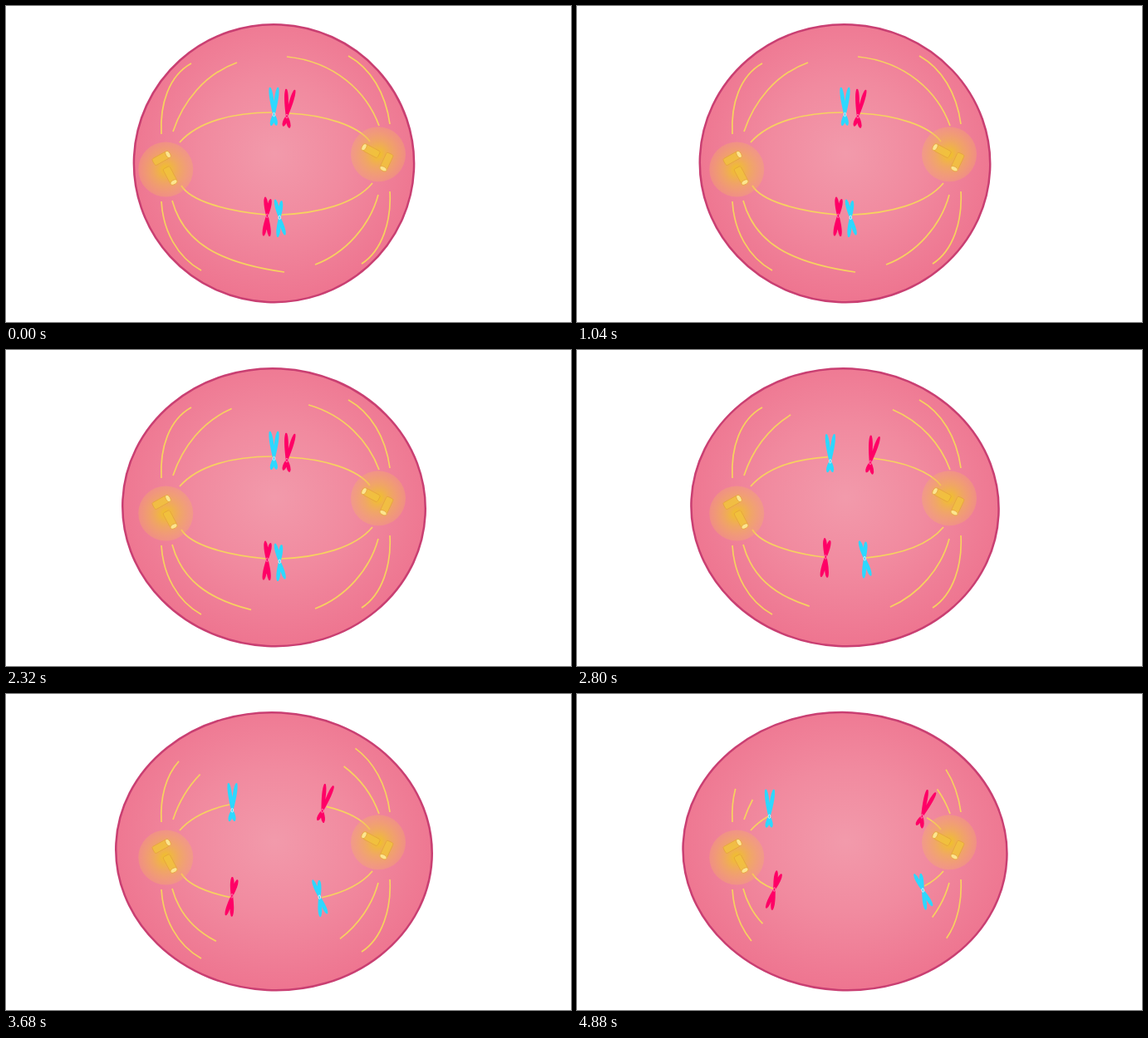
An HTML page for the animation above (4.96 s loop, 680 px wide and 380 px high).

```html
<!DOCTYPE html>
<html lang="en">
<head>
<meta charset="utf-8">
<title>Anaphase</title>
<style>
  html, body { margin: 0; width: 100%; height: 100%; overflow: hidden; background: #fff; }
  svg { display: block; }
</style>
</head>
<body>
<svg width="680" height="380" viewBox="0 0 680 380">
  <defs>
    <radialGradient id="plasm" cx=".5" cy=".465" r=".53">
      <stop offset="0" stop-color="#f29aab"/>
      <stop offset=".5" stop-color="#f18a9f"/>
      <stop offset="1" stop-color="#ee7590"/>
    </radialGradient>
    <radialGradient id="glow">
      <stop offset="0" stop-color="#efc61e" stop-opacity=".95"/>
      <stop offset=".5" stop-color="#f0b848" stop-opacity=".65"/>
      <stop offset="1" stop-color="#f3b45e" stop-opacity=".32"/>
    </radialGradient>
    <g id="centriole" stroke="#e6a53e" stroke-width=".8">
      <rect x="-20" y="-4.5" width="20" height="9" rx="2" fill="#f1c13f" fill-opacity=".85"/>
      <ellipse rx="2.6" ry="4.5" fill="#fce58f"/>
    </g>
  </defs>
  <ellipse id="cell" cx="322.5" cy="189.2" ry="167" transform="rotate(2.9 322.5 189.2)"
    fill="url(#plasm)" stroke="#c93f72" stroke-width="2.5"/>
  <g id="fibres" fill="none" stroke="#f7d25f" stroke-width="1.7"></g>
  <circle cx="192.3" cy="196.5" r="33" fill="url(#glow)"/>
  <circle cx="448" cy="178.3" r="33" fill="url(#glow)"/>
  <use href="#centriole" transform="translate(195 178.5) rotate(-29)"/>
  <use href="#centriole" transform="translate(202 212) rotate(62)"/>
  <use href="#centriole" transform="translate(431 169.7) rotate(208)"/>
  <use href="#centriole" transform="translate(454 195.7) rotate(115)"/>
  <g id="chromosomes"></g>
</svg>
<script>
const STEP = 80, STEPS = 62, MOVE_START = 29, MOVE_END = 59.8;
const $ = id => document.getElementById(id);
const clamp = v => Math.max(0, Math.min(1, v));

function add(parent, tag, attrs) {
  const el = document.createElementNS('http://www.w3.org/2000/svg', tag);
  for (const key in attrs) el.setAttribute(key, attrs[key]);
  parent.append(el);
  return el;
}

// Spindle fibres drawn from the pole outwards: path, step shortening begins, length lost
const fibres = [
  ['M187 154C185 118 196 84 223 69', 39, 57],
  ['M201 151C213 115 239 82 278 68', 26.5, 91],
  ['M209 164C231 139 273 128 320 128', MOVE_START, 93],
  ['M211 216C222 234 262 246 313 251', MOVE_START, 78],
  ['M187 235C189 270 206 302 235 318', 47, 33],
  ['M200 234C214 285 257 309 335 320', 13.5, 122],
  ['M462 142C457 105 439 75 412 60', 42, 45],
  ['M449 144C434 103 396 67 338 61', 19.5, 113],
  ['M438 163C424 144 384 131 340 129', MOVE_START, 84],
  ['M441 213C420 238 377 249 331 251', MOVE_START, 90],
  ['M462 223C464 258 453 294 428 310', 49, 23.5],
  ['M448 227C438 264 409 297 372 311', 33, 71]
].map(([d, start, loss]) => {
  const el = add($('fibres'), 'path', { d });
  return { el, start, loss, length: el.getTotalLength() };
});

// One chromosome arm: a rounded petal from the centromere to its tip
function petal([x, y]) {
  const len = Math.hypot(x, y), nx = -y / len * 2.1, ny = x / len * 2.1;
  const side = s => `${x * .4 + s * nx * .6} ${y * .4 + s * ny * .6} ${x * .8 + s * nx} ${y * .8 + s * ny}`;
  const back = `${x * .8 - nx} ${y * .8 - ny} ${x * .4 - nx * .6} ${y * .4 - ny * .6}`;
  return `M0 0C${side(1)} ${x} ${y}C${back} 0 0Z`;
}

const BLUE = ['#2dd8ff', '#d9f7ff'], RED = ['#ff0066', '#ff7fae'];
const chromosomes = [
  { at: [322.5, 130.5], move: [-91, 16.8], turn: 1, hue: BLUE, tips: [[-4.7, -31.5], [4.7, -31.5], [-3.2, 12.3], [2.8, 12]] },
  { at: [338, 132.5], move: [77.3, 14.5], turn: 13, hue: RED, tips: [[-.8, -31.5], [9.3, -30.5], [-4, 11], [3, 13]] },
  { at: [314.3, 252.3], move: [-76.8, -17.3], turn: 13, hue: RED, tips: [[-2.2, -21.5], [4, -19], [-4.3, 23], [2.8, 23.5]] },
  { at: [329.3, 254.3], move: [87, -18.3], turn: -14, hue: BLUE, tips: [[-5.2, -20.5], [2.2, -19], [-2.2, 22.5], [6.2, 20]] }
].map(c => {
  const el = add($('chromosomes'), 'g', {});
  const [fill, ring] = c.hue;
  add(el, 'path', { d: c.tips.map(petal).join(''), fill, stroke: fill, 'stroke-width': 2.4, 'stroke-linejoin': 'round' });
  add(el, 'ellipse', { rx: 1.3, ry: 2.3, fill, stroke: ring, 'stroke-width': .9 });
  return { ...c, el };
});

function draw(now) {
  const step = Math.floor(now / STEP) % STEPS;
  $('cell').setAttribute('rx', 168.6 + 26.4 * clamp(step / 56));
  for (const { el, start, loss, length } of fibres) {
    const left = length - loss * clamp((step - start) / (MOVE_END - start));
    el.setAttribute('stroke-dasharray', `${left} 999`);
  }
  const q = clamp((step - MOVE_START) / (MOVE_END - MOVE_START));
  for (const { el, at, move, turn } of chromosomes) {
    el.setAttribute('transform',
      `translate(${at[0] + move[0] * q} ${at[1] + move[1] * q}) rotate(${turn * q})`);
  }
}

const begin = performance.now();
function tick() {
  draw(performance.now() - begin);
  requestAnimationFrame(tick);
}
tick();
</script>
</body>
</html>
```
